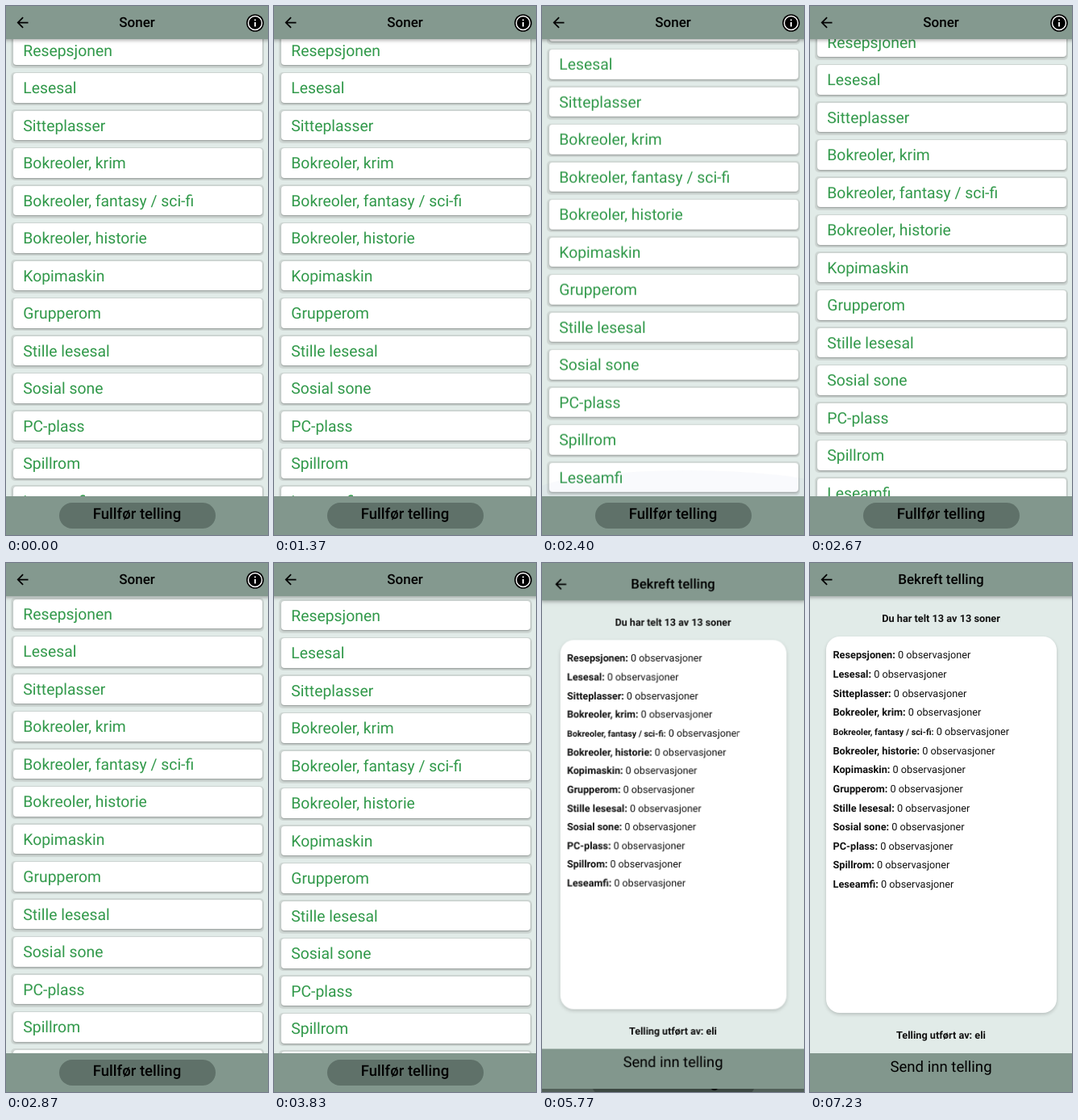
Write an HTML page that moves like this. It is 325 px wide and 655 px high and loops after 8 s.

```html
<!DOCTYPE html>
<html lang="no">
<head>
<meta charset="utf-8">
<title>Soner</title>
<style>
  html, body { margin: 0; width: 100%; height: 100%; overflow: hidden; }
  #stage {
    position: relative; width: 325px; height: 655px; overflow: hidden;
    background: #e1ebe8; color: #111;
    font: 400 12.72px Roboto, sans-serif;
    text-rendering: geometricPrecision;
  }
  #stage div, #stage svg { position: absolute; }
  .page { inset: 0; transform-origin: 162.5px 320px; }
  .head, .foot, .bg { left: -4px; right: -4px; }
  .bg { top: -24px; bottom: -2px; background: #e1ebe8; }
  .head { top: -24px; height: 65px; background: #84998f; box-shadow: 0 2px 4px rgba(0, 0, 0, .28); }
  .foot { top: 607px; height: 50px; background: #82978d; }
  .mid { left: 0; width: 325px; height: 24px; line-height: 24px; text-align: center; white-space: nowrap; }
  .title { top: 8.5px; font-size: 17px; font-weight: 500; color: #000; }
  .action { font-size: 18.6px; color: #000; }
  .back { left: 10px; top: 10px; width: 21px; height: 21px; }
  .info { left: 297px; top: 8.5px; width: 24px; height: 24px; }
  b { font-weight: 700; }

  .view { left: 0; top: 41px; width: 325px; height: 566px; overflow: hidden; }
  .list { left: 0; top: 0; width: 325px; animation: scroll 8s infinite linear; }
  .wrap { left: 6px; width: 314px; height: 41.5px; border-radius: 5px; background: #cfd7d4; }
  .card {
    left: 2.5px; top: 1.5px; width: 309px; height: 36.5px; border-radius: 4px;
    background: #fff; box-shadow: 0 1px 2px rgba(0, 0, 0, .3);
    color: #31994a; font-size: 19.35px; line-height: 37px; text-indent: 12.8px; white-space: nowrap;
  }
  .glow {
    left: -20px; bottom: -34px; width: 400px; height: 66px; border-radius: 50%;
    background: #7f93c8; opacity: 0; animation: glow 8s infinite linear;
  }
  .pill { left: 65.5px; top: 615px; width: 194.5px; height: 32px; border-radius: 16px; background: #5f7169; }
  .scrim { inset: -30px; background: #000; opacity: 0; animation: scrim 8s infinite linear; }

  .sheet {
    left: 20px; top: 91px; width: 286px; height: 466px; border-radius: 17px;
    background: #fff; box-shadow: 0 2px 4px rgba(0, 0, 0, .18);
  }
  .row { left: 8.5px; height: 24px; line-height: 24px; white-space: nowrap; }
  .small { font-size: 10.8px; }

  #zones { animation: leave 8s infinite linear; }
  #confirm { animation: enter 8s infinite linear, fade 8s infinite linear; }

  @keyframes scroll {
    0%, 21.25% { transform: translateY(-10px); animation-timing-function: cubic-bezier(.35, .1, .7, .8); }
    24.125% { transform: translateY(-31px); animation-timing-function: cubic-bezier(.2, .6, .5, 1); }
    28.5%, 31.5% { transform: translateY(-39.3px); animation-timing-function: cubic-bezier(.35, .1, .7, .8); }
    33.375% { transform: translateY(-20.3px); animation-timing-function: cubic-bezier(.2, .6, .5, 1); }
    37.5%, 100% { transform: translateY(0); }
  }
  @keyframes glow {
    0%, 28.5% { opacity: 0; }
    30%, 31.5% { opacity: .05; }
    33%, 100% { opacity: 0; }
  }
  @keyframes leave {
    0%, 70.875% { transform: scale(1); animation-timing-function: cubic-bezier(.3, 0, .8, .15); }
    71.5% { transform: scale(1.02); animation-timing-function: cubic-bezier(.05, .7, .1, 1); }
    74.625%, 100% { transform: scale(1.05); }
  }
  @keyframes enter {
    0%, 70.875% { transform: scale(.85); animation-timing-function: cubic-bezier(.3, 0, .8, .15); }
    71.5% { transform: scale(.91); animation-timing-function: cubic-bezier(.05, .7, .1, 1); }
    74.625%, 100% { transform: scale(1); }
  }
  @keyframes fade {
    0%, 71.344% { opacity: 0; }
    71.813%, 100% { opacity: 1; }
  }
  @keyframes scrim {
    0%, 71.65% { opacity: 0; }
    72.44%, 100% { opacity: .6; }
  }
</style>
</head>
<body>
<div id="stage">
  <div id="zones" class="page">
    <div class="bg"></div>
    <div class="view"><div class="list"></div><div class="glow"></div></div>
    <div class="head"></div>
    <svg class="back" viewBox="0 0 24 24"><path d="M20 11H7.83l5.59-5.59L12 4l-8 8 8 8 1.41-1.41L7.83 13H20z"/></svg>
    <div class="mid title">Soner</div>
    <svg class="info" viewBox="0 0 24 24">
      <circle cx="12" cy="12" r="10.8"/>
      <circle cx="12" cy="12" r="8.5" fill="none" stroke="#fff" stroke-width="1.4"/>
      <path d="M11.1 7.4h1.8v1.8h-1.8zM11.1 11h1.8v5.4h-1.8z" fill="#fff"/>
    </svg>
    <div class="foot"></div>
    <div class="pill"></div>
    <div class="mid action" style="top:616.5px;font-weight:500">Fullfør telling</div>
  </div>
  <div class="scrim"></div>
  <div id="confirm" class="page">
    <div class="bg"></div>
    <div class="head"></div>
    <svg class="back" viewBox="0 0 24 24"><path d="M20 11H7.83l5.59-5.59L12 4l-8 8 8 8 1.41-1.41L7.83 13H20z"/></svg>
    <div class="mid title">Bekreft telling</div>
    <div class="mid" style="top:57.5px"><b>Du har telt 13 av 13 soner</b></div>
    <div class="sheet"></div>
    <div class="mid" style="top:574px"><b>Telling utført av: eli</b></div>
    <div class="foot"></div>
    <div class="mid action" style="top:612px">Send inn telling</div>
  </div>
</div>
<script>
  const zones = ['Resepsjonen', 'Lesesal', 'Sitteplasser', 'Bokreoler, krim',
    'Bokreoler, fantasy / sci-fi', 'Bokreoler, historie', 'Kopimaskin', 'Grupperom',
    'Stille lesesal', 'Sosial sone', 'PC-plass', 'Spillrom', 'Leseamfi'];
  const list = document.querySelector('.list');
  const sheet = document.querySelector('.sheet');

  function add(parent, cls, top, html) {
    const el = document.createElement('div');
    el.className = cls;
    el.style.top = top + 'px';
    el.innerHTML = html;
    parent.append(el);
  }

  zones.forEach((name, i) => {
    add(list, 'wrap', 4.4 + i * 46.5, `<div class="card">${name}</div>`);
    const cls = name.length > 20 ? ' class="small"' : '';
    add(sheet, 'row', 12.3 + i * 23.65, `<b${cls}>${name}:</b> 0 observasjoner`);
  });
</script>
</body>
</html>
```
